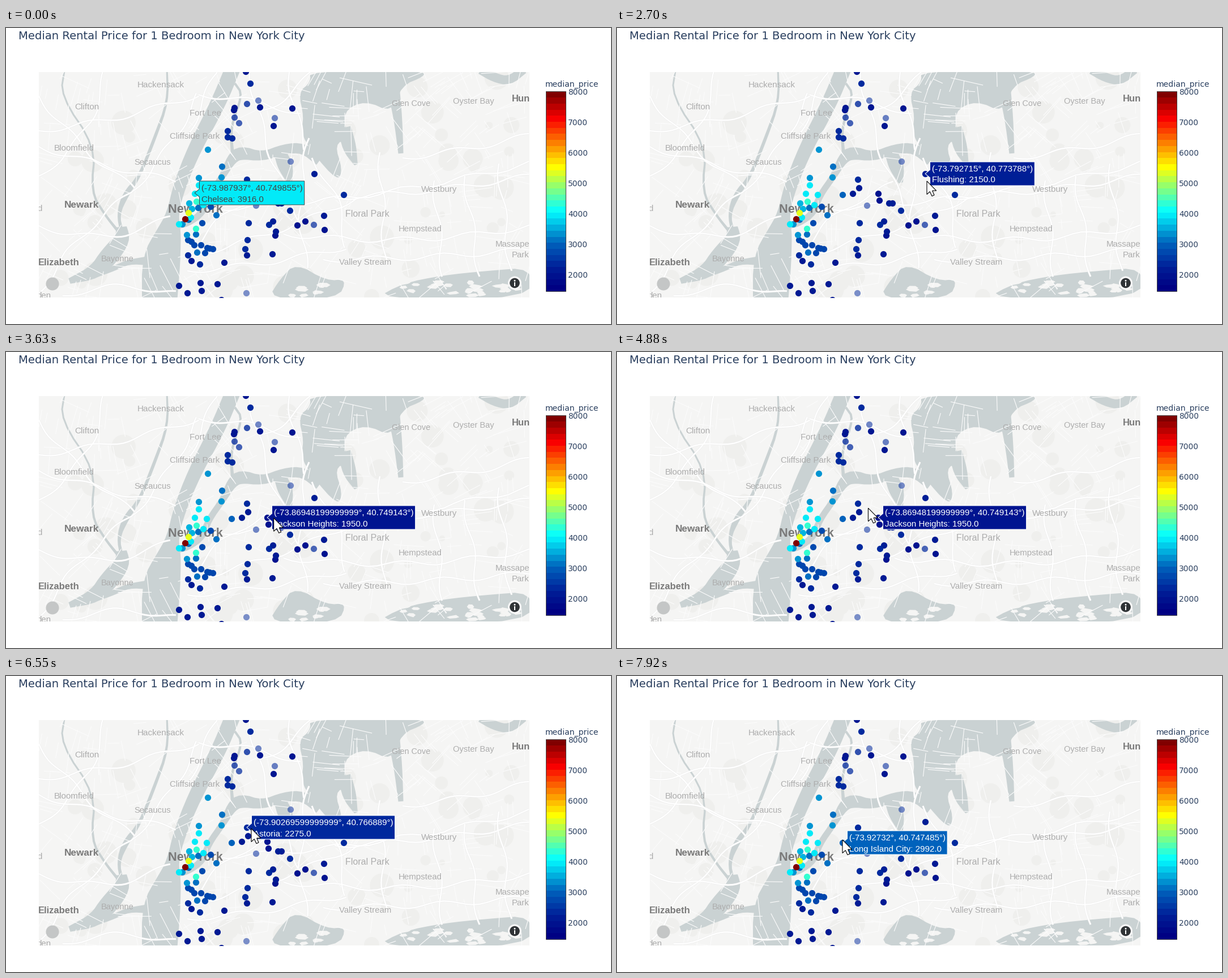
Animation of 1068 by 524 pixels, one loop 8 s. Source, as a matplotlib script:

```python
import numpy as np
import matplotlib.pyplot as plt
from matplotlib.animation import FuncAnimation
from matplotlib.collections import LineCollection, PolyCollection
from matplotlib.colors import LinearSegmentedColormap
from matplotlib.patches import Circle, Polygon, Rectangle

W, H, DPI = 1068, 524, 100
LOOP, STEP = 8000, 40
PT = 72 / DPI
LEFT, RIGHT, TOP, BOTTOM = 58, 924, 78, 477
P_MIN, P_MAX = 1463, 8000

INK, LAND, WATER = "#2a3f5f", "#f5f5f4", "#cad2d3"
SANS = "Liberation Sans"
rng = np.random.default_rng(4)

JET = LinearSegmentedColormap.from_list("price", [
    (0, "#000083"), (.075, "#001490"), (.105, "#001e96"), (.125, "#00289d"),
    (.234, "#0062bc"), (.375, "#02eaf8"), (.40, "#05ffff"), (.625, "#ffff00"),
    (.875, "#fa0000"), (1, "#800000")], N=1024)

fig = plt.figure(figsize=(W / DPI, H / DPI), dpi=DPI, facecolor="white")


def layer(x0, x1, y0, y1):
    """Axes whose data units are stage pixels, y pointing down."""
    ax = fig.add_axes([x0 / W, 1 - y1 / H, (x1 - x0) / W, (y1 - y0) / H])
    ax.set(xlim=(x0, x1), ylim=(y1, y0))
    ax.axis("off")
    return ax


def label(ax, x, y, text, size, color, font="DejaVu Sans", **kw):
    return ax.text(x, y, text, fontsize=size * PT, color=color, family=font,
                   va="center_baseline", clip_on=True, **kw)


def price_color(price):
    return JET((price - P_MIN) / (P_MAX - P_MIN))


def smooth(points, closed=False, rounds=2):
    """Chaikin corner cutting."""
    p = np.array(points, float)
    for _ in range(rounds):
        q = np.roll(p, -1, axis=0) if closed else p[1:]
        a = p if closed else p[:-1]
        cut = np.stack([.75 * a + .25 * q, .25 * a + .75 * q], 1).reshape(-1, p.shape[1])
        p = cut if closed else np.vstack([p[:1], cut, p[-1:]])
    return p


def ribbon(points):
    """Outline of a river given as (x, y, width)."""
    p = smooth(points)
    d = np.gradient(p[:, :2], axis=0)
    normal = np.stack([-d[:, 1], d[:, 0]], 1) / np.hypot(*d.T)[:, None]
    side = normal * p[:, 2:] / 2
    return np.vstack([p[:, :2] + side, (p[:, :2] - side)[::-1]])


def road(x0, y0, x1, y1, bow=0):
    """Slightly winding line; bow is its sideways bulge in the middle."""
    s = np.linspace(0, 1, 30)
    dx, dy = x1 - x0, y1 - y0
    length = np.hypot(dx, dy)
    off = bow * np.sin(np.pi * s) + 5 * np.sin(length / 60 * np.pi * s)
    return np.stack([x0 + dx * s - dy / length * off,
                     y0 + dy * s + dx / length * off], 1)


# ---- base map
base = layer(LEFT, RIGHT, TOP, BOTTOM)
base.add_patch(Rectangle((LEFT, TOP), RIGHT - LEFT, BOTTOM - TOP, fc=LAND, lw=0))
for _ in range(70):
    spot = rng.uniform((60, 80), (924, 476))
    base.add_patch(Circle(spot, rng.uniform(5, 22), fc="#efefed", lw=0))

streets = []
for _ in range(420):
    x, y = rng.uniform(LEFT, RIGHT), rng.uniform(TOP, BOTTOM)
    turn = .5 * np.sin(x / 70) + .4 * np.cos(y / 55) + rng.integers(2) * np.pi / 2
    d = rng.uniform(8, 30) * np.array([np.cos(turn), np.sin(turn)])
    streets.append([(x - d[0], y - d[1]), (x + d[0], y + d[1])])
base.add_collection(LineCollection(streets, colors="#fcfcfc", linewidths=.8))

hudson = [(401, 70, 27), (374, 135, 27), (332, 215, 24), (306, 280, 22),
          (294, 328, 20), (288, 362, 44), (274, 410, 68), (271, 485, 62)]
east_river = [(296, 350, 14), (322, 346, 11), (348, 326, 12), (357, 298, 11),
              (384, 260, 11), (398, 232, 18), (414, 220, 24), (452, 228, 16),
              (492, 214, 18), (524, 212, 18), (554, 234, 20)]
flushing_bay = [(484, 222, 22), (494, 246, 28), (501, 274, 8)]
newark_bay = [(204, 352, 18), (206, 374, 28), (182, 404, 34), (158, 432, 26), (112, 448, 10)]
kill = [(160, 436, 10), (190, 426, 9), (216, 414, 8), (252, 412, 16)]
hackensack = [(204, 360, 6), (198, 330, 5), (210, 296, 12), (236, 262, 5),
              (262, 196, 6), (286, 130, 4), (284, 70, 3)]
passaic = [(198, 360, 5), (174, 330, 4), (150, 290, 4), (158, 210, 3),
           (96, 120, 3), (104, 70, 3)]
harlem = [(400, 224, 6), (396, 176, 4), (418, 118, 4), (404, 98, 4)]
neck_bay = [(598, 176, 22), (606, 212, 26), (618, 242, 6)]
harbor = [(684, 108, 22), (692, 160, 15), (697, 222, 9)]
oyster_bay = [(838, 74, 16), (862, 88, 16), (888, 94, 16), (914, 74, 14)]
rivers = [hudson, east_river, flushing_bay, newark_bay, kill, hackensack,
          passaic, harlem, neck_bay, harbor, oyster_bay]

sound = [(536, 76), (538, 96), (516, 114), (526, 158), (520, 184), (540, 220),
         (586, 272), (594, 250), (580, 206), (604, 196), (594, 148), (634, 128),
         (682, 150), (698, 102), (738, 86), (738, 76)]
jamaica = [(462, 480), (484, 444), (512, 416), (566, 448), (602, 444), (586, 480)]
south_bays = [(650, 480), (700, 452), (770, 438), (848, 430), (928, 424), (928, 480)]
waters = [ribbon(r) for r in rivers]
waters += [smooth(w, True) for w in (sound, jamaica, south_bays)]
base.add_collection(PolyCollection(waters, facecolors=WATER, linewidths=0))

isles = []
for k in range(34):
    x, y = rng.uniform(690, 920) if k < 26 else rng.uniform(495, 580), rng.uniform(448, 474)
    a = np.linspace(0, 2 * np.pi, 7)[:-1]
    isles.append(np.stack([x + rng.uniform(5, 13) * np.cos(a),
                           y + rng.uniform(2, 5, 6) * np.sin(a)], 1))
base.add_collection(PolyCollection(isles, facecolors=LAND, linewidths=0))

west_roads = [
    (58, 470, 222, 290, -12), (222, 290, 340, 118, 8), (58, 262, 175, 78, 25),
    (58, 182, 340, 118, 8), (340, 118, 520, 152, -6), (320, 190, 372, 78, 0),
    (100, 474, 300, 470, -14), (58, 350, 290, 335, 26), (58, 210, 300, 270, 4),
    (58, 120, 226, 284, 10)]
east_roads = [
    (315, 410, 490, 275, -18), (320, 430, 600, 388, 6), (340, 400, 620, 300, 8),
    (370, 320, 924, 240, 14), (580, 300, 924, 262, 6), (490, 365, 924, 352, 16),
    (560, 410, 924, 392, 4), (535, 195, 530, 425, 12), (540, 230, 600, 388, -14),
    (756, 270, 772, 440, 0), (810, 262, 836, 440, 0), (870, 240, 890, 430, 0),
    (450, 146, 540, 78, 8), (500, 78, 530, 215, 4), (430, 78, 520, 340, 12),
    (660, 220, 670, 420, 0), (700, 230, 924, 190, 4)]
lines = [road(*r) for r in west_roads + east_roads]
base.add_collection(LineCollection(lines, colors="#ececec", linewidths=2.4))
base.add_collection(LineCollection(lines, colors="white", linewidths=1.7))

TOWNS = [(273, 99, "Hackensack", 15.2), (143, 138, "Clifton", 15.2),
         (352, 149, "Fort Lee", 15), (333, 190, "Cliffside Park", 15),
         (120, 211, "Bloomfield", 15.2), (259, 236, "Secaucus", 14.6),
         (197, 408, "Bayonne", 14.6), (715, 132, "Glen Cove", 14.4),
         (825, 128, "Oyster Bay", 14.6), (765, 284, "Westbury", 15),
         (638, 328, "Floral Park", 16), (731, 354, "Hempstead", 15),
         (634, 414, "Valley Stream", 15), (894, 381, "Massape", 15),
         (908, 401, "Park", 15), (60, 318, "d", 15), (67, 473, "den", 15)]
CITIES = [(334, 319, "New York", 21.6), (134, 312, "Newark", 17.3),
          (93, 414, "Elizabeth", 16.6), (909, 124, "Hun", 16.6)]
for town in TOWNS:
    label(base, *town, "#adadad", SANS, ha="center")
for city in CITIES:
    label(base, *city, "#7a7a7a", SANS, ha="center", weight="bold")

# ---- price markers
BRONX = {
    2000: [(423, 77), (403, 141), (402, 145), (448, 140), (505, 142), (472, 173)],
    2300: [(431, 98), (391, 182), (391, 193), (399, 195)]}
MANHATTAN = {
    2700: [(361, 316), (346, 345)],
    3080: [(381, 245), (339, 318), (371, 331), (322, 339)],
    3330: [(356, 215), (380, 264), (340, 265), (311, 347)],
    3550: [(323, 310), (328, 320)],
    3916: [(340, 278), (333, 293), (354, 295), (348, 313), (326, 335), (305, 347)],
    4350: [(336, 307), (335, 355)],
    5400: [(322, 327)],
    8000: [(316, 338)]}
BROOKLYN = {
    2050: [(327, 412), (385, 415), (343, 451), (373, 453), (305, 456),
           (320, 469), (345, 465), (380, 481)],
    2300: [(321, 402), (342, 418)],
    2650: [(321, 375), (327, 378), (332, 384), (344, 384), (355, 389),
           (359, 390), (365, 391), (351, 398)],
    3080: [(335, 365), (337, 397)],
    3330: [(319, 366)]}
QUEENS = {
    1930: [(461, 293), (463, 305), (475, 367), (514, 349), (528, 342), (562, 357)],
    2080: [(427, 283), (416, 293), (561, 332), (425, 402), (470, 400), (476, 360)],
    2150: [(480, 310), (486, 310), (471, 342), (544, 258)],
    2300: [(425, 268), (426, 375), (422, 391), (428, 345), (464, 348),
           (596, 295), (501, 323)],
    2992: [(398, 295)]}
FADED = [(445, 128, .55), (425, 134, .8), (403, 158, .75), (411, 168, .72),
         (474, 159, .58), (502, 236, .52), (441, 314, .55), (543, 348, .7),
         (424, 469, .5)]
SIZE = (11.2 * PT) ** 2
for borough in (BRONX, BROOKLYN, QUEENS, MANHATTAN):
    for price, spots in borough.items():
        base.scatter(*zip(*spots), s=SIZE, color=[price_color(price)], lw=0, zorder=4)
for x, y, alpha in FADED:
    base.scatter(x, y, s=SIZE, color=[price_color(2280)], alpha=alpha, lw=0, zorder=4)

# ---- map badges
base.add_patch(Circle((82, 453), 11.5, fc="#c4c6c6", lw=0, zorder=5))
base.add_patch(Circle((898, 451.5), 12, fc="#f8f8f8", lw=0, zorder=5))
base.add_patch(Circle((898, 451.5), 8.8, fc="#2f3336", lw=0, zorder=5))
base.add_patch(Circle((898, 447.3), 1.5, fc="white", lw=0, zorder=6))
base.add_patch(Rectangle((896.7, 450), 2.6, 6.6, fc="white", lw=0, zorder=6))

# ---- title and colour bar
top = layer(0, W, 0, H)
label(top, 22, 13, "Median Rental Price for 1 Bedroom in New York City", 19.7, INK)
label(top, 952, 98, "median_price", 14, INK)
BANDS, BAR_TOP, BAR_BOTTOM = 33, 112, 465.5
edges = np.linspace(BAR_BOTTOM, BAR_TOP, BANDS + 1)
for k in range(BANDS):
    top.add_patch(Rectangle((953, edges[k + 1]), 35, edges[k] - edges[k + 1] + .5,
                            fc=JET(k / (BANDS - 1)), lw=0))
top.add_patch(Rectangle((953, BAR_TOP), 35, BAR_BOTTOM - BAR_TOP,
                        fc="none", ec="#444444", lw=PT))
for price in range(2000, 8001, 1000):
    label(top, 992, 112 + (P_MAX - price) * .054, str(price), 13.8, INK)

# ---- hover labels
HOVERS = [
    (0, 120, 333, 292, "-73.987937°, 40.749855°", "Chelsea", 3916),
    (1770, 2950, 544, 258, "-73.792715°, 40.773788°", "Flushing", 2150),
    (3290, 3450, 486, 310, "-73.846055°, 40.737099°", "Forest Hills", 2150),
    (3450, 3570, 480, 310, "-73.85169599999999°, 40.736981°", "Rego Park", 2150),
    (3570, 4930, 461, 293, "-73.86948199999999°, 40.749143°", "Jackson Heights", 1950),
    (4930, 5200, 427, 283, "-73.900812°, 40.756213°", "Woodside", 2100),
    (5200, 6640, 425, 268, "-73.90269599999999°, 40.766889°", "Astoria", 2275),
    (6680, 7790, 380, 264, "-73.944512°, 40.769721°", "Roosevelt Island", 3330),
    (7790, 8000, 398, 295, "-73.92732°, 40.747485°", "Long Island City", 2992)]
renderer = fig.canvas.get_renderer()


def hover(x, y, where, name, price):
    ink = "#444444" if price > 3600 else "white"
    x0 = x + 8.5
    texts = [label(top, x0 + 3.2, y + dy, s, 15.1, ink, SANS, zorder=9)
             for dy, s in [(-9.5, f"({where})"), (10, f"{name}: {price:.1f}")]]
    x1 = x0 + 6.5 + max(t.get_window_extent(renderer).width for t in texts)
    shape = [(x, y), (x0, y - 7), (x0, y - 21), (x1, y - 21), (x1, y + 21),
             (x0, y + 21), (x0, y + 7)]
    box = Polygon(shape, fc=price_color(price), ec=ink, lw=PT, zorder=8)
    top.add_patch(box)
    return [box, *texts]


hovers = [(start, end, hover(*rest)) for start, end, *rest in HOVERS]

# ---- pointer
ARROW = np.array([(0, 0), (0, 23.5), (5.3, 18.6), (9, 26.6), (13, 24.8),
                  (9.7, 17), (16.7, 17)])
pointer = Polygon(ARROW, fc="white", ec="black", lw=1.1 * PT, zorder=12)
top.add_patch(pointer)

# Moves as (start, end, x, y); the pointer rests in between.
START = (844, 494)
MOVES = [(120, 370, 699, 372), (830, 900, 690, 363), (1070, 1220, 689, 354),
         (1220, 1850, 548, 272), (2680, 2700, 547, 271), (2870, 3400, 487, 291),
         (3400, 3630, 472, 294), (4330, 4420, 468, 291), (4660, 4890, 445, 276),
         (4890, 4980, 431, 279), (5120, 5290, 433, 273), (6520, 6540, 433, 270),
         (6550, 6760, 385, 266), (7520, 7920, 398, 290)]


def pointer_at(t):
    pos = np.array(START, float)
    for start, end, x, y in MOVES:
        pos += (np.array([x, y]) - pos) * np.clip((t - start) / (end - start), 0, 1)
    return pos


def update(i):
    t = i * STEP + STEP / 2
    for start, end, parts in hovers:
        for part in parts:
            part.set_visible(start <= t < end)
    pointer.set_visible(t >= 120)
    pointer.set_xy(ARROW + pointer_at(t))
    return [pointer]


anim = FuncAnimation(fig, update, frames=LOOP // STEP, interval=STEP,
                     repeat=True, repeat_delay=0, blit=False)
plt.show()
```
